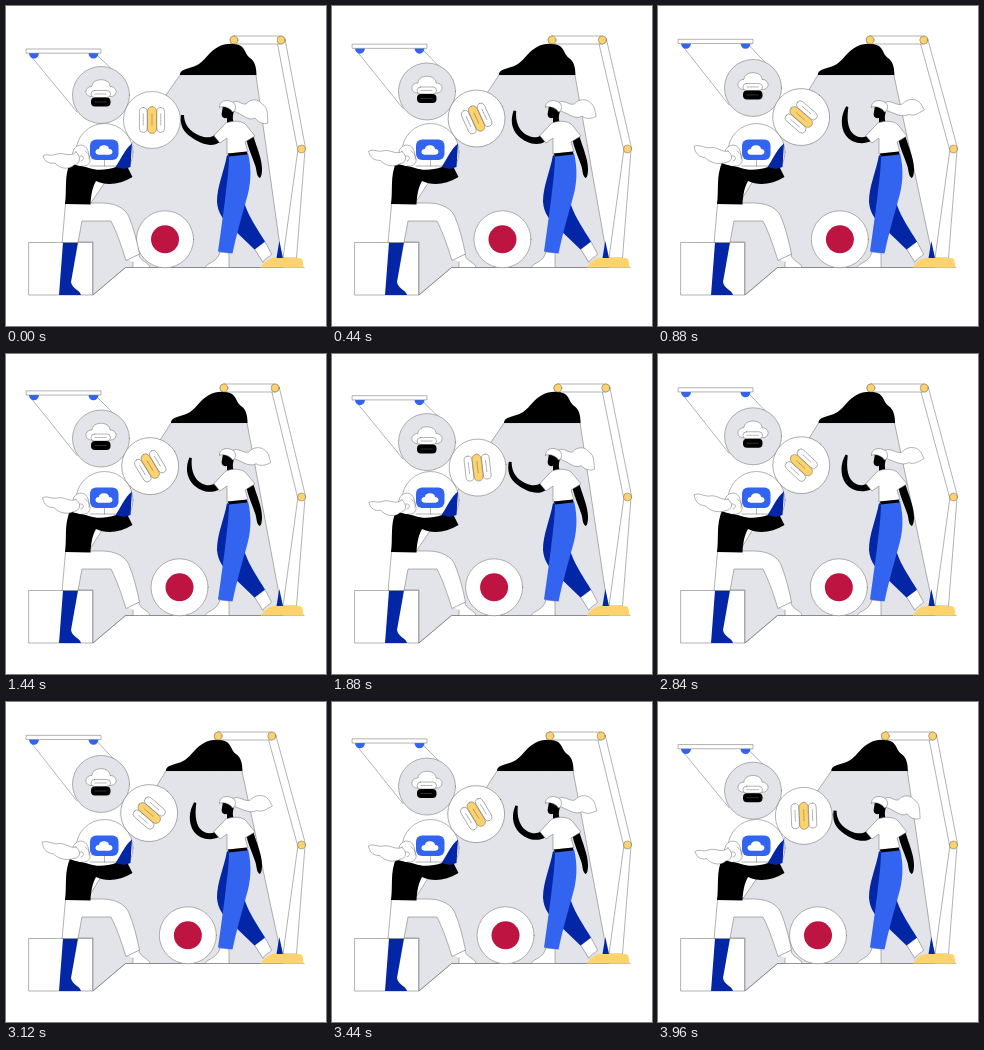
Write an HTML page that moves like this. It is 320 px wide and 320 px high and loops after 4000 ms.

```html
<!DOCTYPE html>
<html lang="en">
<head>
<meta charset="utf-8">
<title>Cloud workshop</title>
<style>
  html, body { margin: 0; width: 100%; height: 100%; overflow: hidden; background: #fff; }
  svg { display: block; width: 100%; height: 100%; }
  .line { stroke: #66666a; stroke-width: .5; stroke-linejoin: round; stroke-linecap: round; fill: none; }
  .white { fill: #fff; }
  .grey { fill: #e3e4ea; }
  .black { fill: #000; }
  .blue { fill: #3264f0; }
  .navy { fill: #0226a6; }
  .yellow { fill: #ffd36b; }
</style>
</head>
<body>
<svg viewBox="0 0 320 320">
  <defs>
    <path id="cloud" d="M-10 6 C-17 6 -17 -4 -9 -4 C-9 -13 9 -13 9 -4 C17 -4 17 6 10 6 Z"/>
    <rect id="pill" x="-3.9" y="-12.5" width="7.8" height="25" rx="3.9"/>
  </defs>

  <!-- light cones -->
  <path id="cone" class="line grey"/>
  <path id="beam" class="line"/>

  <!-- ceiling rail -->
  <g id="rail">
    <path class="blue" d="M23 47 a5 5.5 0 0 0 10 0 Z M82.500 47 a5 5.5 0 0 0 10 0 Z"/>
    <rect class="line white" x="20.500" y="43" width="74.500" height="4.200"/>
  </g>

  <!-- box and floor -->
  <path class="line" d="M87 289 L119.500 261.500 H298"/>
  <rect class="line white" x="23" y="236.500" width="63.500" height="52.500"/>

  <!-- discs -->
  <g id="server">
    <circle class="line grey" cx="95" cy="89" r="28.500"/>
    <use href="#cloud" class="line white" x="95" y="84.500"/>
    <rect class="line white" x="85" y="84.500" width="19.500" height="7" rx="3.500"/>
    <rect class="black" x="85" y="91.500" width="19.500" height="9" rx="4"/>
    <path class="line" d="M89 88 h11 M89 96 h11" stroke-dasharray="2 1"/>
  </g>
  <circle class="line white" cx="98.500" cy="146" r="28.500"/>
  <rect class="blue" x="84" y="133.500" width="28.500" height="20.500" rx="6"/>
  <use href="#cloud" class="white" transform="translate(98 145.300) scale(.56)"/>
  <path class="line" d="M98.500 154 v6 M84 160 h26"/>
  <g id="pills">
    <circle class="line white" r="28.500"/>
    <use href="#pill" class="line white" x="-8.700"/>
    <use href="#pill" class="line white" x="8.700"/>
    <rect class="line yellow" x="-4.500" y="-13.500" width="9" height="27" rx="4.500"/>
    <path class="line" d="M-8.700 -6 v12 M0 -6 v12 M8.700 -6 v12" stroke-dasharray="2 1"/>
  </g>
  <g id="ball">
    <circle class="line white" r="28.500"/>
    <circle r="14" fill="#bd1442"/>
  </g>

  <!-- person on the left -->
  <path class="navy" d="M57 236.500 H72 L65 276 C66 283 74 284 75 289 H53 L54 276 Z"/>
  <path class="line white" d="M121 253 L133 248 C133 255 143 256 144 261.500 H127 V256"/>
  <path class="line white" d="M60 197 H96 C110 197 120 203 123 211 C128 223 131 236 133.500 248 L120 254.500 C116 242 112 229 105 215 H76 L72 236.500 H56.500 Z"/>
  <path class="line white" d="M68 143 C72 137 80 138 82 145 L84 153 C85 158 80 161 75 160 L70 166 L63 161 Z"/>
  <path class="black" d="M64 157 C70 160 77 160 83 162 C91 165 101 164 110 161 L121 160 L126.500 171 C114 179 100 180 90 175 C86 182 85 190 84.500 198.500 L59 198 C61 184 58 170 64 157 Z"/>
  <path id="hairL" class="line white"/>
  <path class="line" d="M74 150 c4 -1 5 4 1 5 M79 145 c3 2 5 4 4 8"/>
  <path class="navy" d="M109.500 161 C115 153 119 143 126 137.500 L124.500 161 L118 163 Z"/>

  <!-- person on the right -->
  <path class="line white" d="M249 243 L259 235.500 L265.500 248 C264 251 260 251 257 256 Z"/>
  <path class="line white" d="M214 246 L223 247 V261.500 H199 C202 256 211 257 214 246 Z"/>
  <path class="navy" d="M221 149 C218 166 211 180 211 196 C212 207 217 213 222 218 L248.500 243.500 L259 235.500 C252 224 243 211 239 199 L238 160 Z"/>
  <path class="blue" d="M223 149 L242 147 C246 164 245 179 240 195 C235 213 230 230 226.500 247.500 L212 245.500 C215 225 217 209 219 194 C221 177 223 163 223 149 Z"/>
  <path id="armR" class="black"/>
  <path class="black" d="M240 132 L247 129 C251 142 256 153 256 163 C256 168 255 172 253.500 172 C250 169 251 164 249 159 C246 150 242 142 240 132 Z"/>
  <path id="hairR" class="line white"/>
  <path class="black" d="M217 99 L228.500 99 C229 106 225 110 228 117 H221 L221 112 C216 113 215 109 216 106 Z"/>
  <path class="line white" d="M213.500 101 C213 95 221 92 228 97 C231 101 229 106 226.500 106 C224 102 219 100 213.500 101 Z"/>
  <path class="line white" d="M220 117 C227 114 237 115 240 119 L249 130 L239 136 L242 146 L221 148 V132 L214 137 L208 130 Z"/>
  <path class="black" d="M222 147.500 L241 145.500 L241 148.500 L222.500 150.500 Z"/>

  <!-- lamp -->
  <path class="navy" d="M270.500 252 L273.300 235 L277 252 Z"/>
  <path class="line white" d="M292 143 L277 252 H290.500 L299 144 Z"/>
  <path id="lowerArm" class="line white"/>
  <path id="upperArm" class="line white"/>
  <path id="shade" class="black" d="M174 69 C174 62 186 63 193 58 C201 52 204 45 212 41 C219 37 229 37 235 40 C240 44 239 48 244 52 C249 55 250.500 62 250.500 69 Z"/>
  <circle id="jointA" class="line yellow" cy="34" r="4"/>
  <circle id="jointB" class="line yellow" cy="34" r="4"/>
  <circle class="line yellow" cx="295.500" cy="143" r="4"/>
  <path class="yellow" d="M255 261.500 C258 256 261 254 267 252 H293 C297 252 297 256 297.500 261.500 Z"/>
</svg>
<script>
const HALF = 1000;
const $ = id => document.getElementById(id);
const set = (id, name, value) => $(id).setAttribute(name, value);
const move = (id, x, y, turn = 0) =>
  set(id, 'transform', `translate(${x} ${y}) rotate(${turn})`);

// Blends two paths that share the same commands.
function blend(a, b, p) {
  const end = b.match(/-?[\d.]+/g).map(Number);
  let i = 0;
  return a.replace(/-?[\d.]+/g, n => +n + (end[i++] - n) * p);
}

const morphs = {
  cone: [
    'M174 69 L57.5 236 H87 V289 L119.5 261.5 H277 L250 69 Z',
    'M158 69 L57.5 236 H87 V289 L119.5 261.5 H277 L234 69 Z'],
  beam: [
    'M24 49 L71 106 M91 49 L120 77',
    'M24 38 L71 98 M91 38 L120 69'],
  hairL: [
    'M70 146 C64 152 58 146 51 148 C44 151 42 147 37 150 C39 156 43 158 49 157 C54 163 63 164 68 159 C74 158 76 151 70 146 Z',
    'M70 145 C63 146 59 139 51 141 C44 140 41 137 36 139 C37 147 41 150 47 151 C53 157 62 158 68 156 C74 156 76 149 70 145 Z'],
  hairR: [
    'M226 97 C231 92 235 99 240 98 C245 92 253 93 256 98 C263 102 261 110 262 117 C257 119 252 116 249 112 C242 116 236 107 227 105 Z',
    'M226 97 C232 92 239 101 245 98 C250 92 258 93 261 95 C264 97 265 101 267 102 C262 105 257 110 251 108 C243 112 235 106 227 104 Z'],
  armR: [
    'M175 109 C174 118 176 125 185 131 C195 138 206 142 214 136 L209 129 C202 134 193 130 187 126 C180 121 178 114 178 109 Z',
    'M190 99 C184 108 183 120 188 129 C193 137 204 139 213 135 L209 130 C202 133 196 130 193 124 C190 116 191 108 192 100 Z'],
};

function draw(t) {
  const phase = t / HALF % 2;
  const p = phase < 1 ? phase : 2 - phase;

  for (const id in morphs) set(id, 'd', blend(...morphs[id], p));

  move('rail', 0, -11 * p);
  move('server', 0, -8 * p);
  move('pills', 146 - 3.2 * p, 114 - 3.4 * p, -56 * p);
  move('ball', 159 + 26 * p, 233.3);
  move('shade', -16 * p, 0);

  const ax = 228 - 18 * p, bx = 275 - 10.5 * p;
  set('jointA', 'cx', ax);
  set('jointB', 'cx', bx);
  set('upperArm', 'd', `M${ax} 30 H${bx} a4 4 0 0 1 0 8 H${ax} a4 4 0 0 1 0 -8 Z`);
  set('lowerArm', 'd', `M${bx - 4} 35 L291.5 143 L299.5 142 L${bx + 4} 33 Z`);
}

const start = performance.now();

function tick(now) {
  draw(Math.max(0, now - start));
  requestAnimationFrame(tick);
}

tick(start);
</script>
</body>
</html>
```
